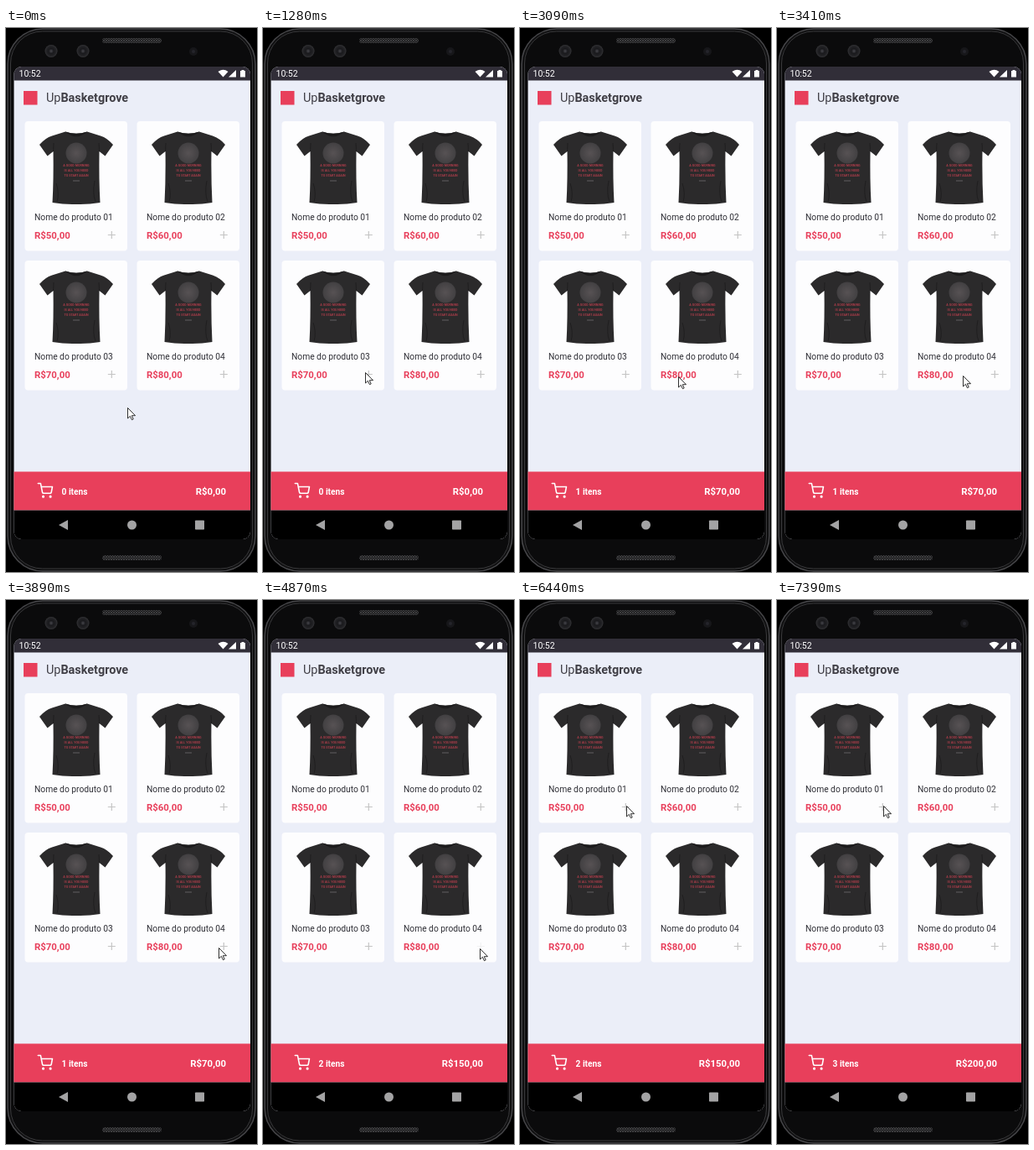
An HTML page that plays this animation: 300 px wide and 648 px high, repeating every 8000 ms.

```html
<!DOCTYPE html>
<html lang="pt-BR">
<head>
<meta charset="utf-8">
<title>Loja</title>
<style>
  html, body { margin: 0; width: 100%; height: 100%; overflow: hidden; background: #000; }
  svg { display: block; width: 100%; height: 100%; font-family: Roboto, Arial, sans-serif; }
  .bold { font-weight: 700; }
  .name { font-size: 10.25px; fill: #2f2f36; }
  .price { font-size: 11.4px; font-weight: 700; fill: #e83f5b; }
  .print { font-size: 3.7px; font-weight: 700; fill: #a83c49; text-anchor: middle; }
</style>
</head>
<body>
<svg viewBox="0 0 300 648" xmlns="http://www.w3.org/2000/svg">
  <defs>
    <radialGradient id="lens">
      <stop offset="0" stop-color="#46464c"/>
      <stop offset=".4" stop-color="#19191c"/>
      <stop offset=".75" stop-color="#222225"/>
      <stop offset="1" stop-color="#333336"/>
    </radialGradient>
    <radialGradient id="disc">
      <stop offset="0" stop-color="#575254"/>
      <stop offset="1" stop-color="#424042"/>
    </radialGradient>
    <pattern id="mesh" width="3" height="3" patternUnits="userSpaceOnUse">
      <rect width="3" height="3" fill="#1b1b1c"/>
      <path d="M0 3L3 0M0 0L3 3" stroke="#444446" stroke-width=".8"/>
    </pattern>
    <clipPath id="screen"><rect x="9.500" y="46" width="282.500" height="563" rx="9"/></clipPath>
    <g id="shirt">
      <path d="M71 123.500Q84 128 97 123.500L113 128.500Q121 131 128 139L118.500 152.500L111.500 147Q111 180 112.500 208Q98 210.500 84 210Q70 210.500 55.500 208Q57 180 56.500 147L49.500 152.500L40 139Q47 131 55 128.500Z" fill="#2b2a2b"/>
      <path d="M71 123.500Q84 135 97 123.500Q84 128 71 123.500Z" fill="#1c1b1c"/>
      <path d="M56.500 147L57 137M111.500 147L111 137M60 185Q64 197 61 207M106 182Q103 197 107 207" fill="none" stroke="#1f1e1f"/>
      <circle cx="84" cy="149" r="12.500" fill="url(#disc)"/>
      <g class="print">
        <text x="84" y="165">A GOOD MORNING</text>
        <text x="84" y="171">IS ALL YOU NEED</text>
        <text x="84" y="177">TO START AGAIN</text>
      </g>
      <path d="M80 182H88" stroke="#6f6d70" stroke-width=".8"/>
    </g>
  </defs>

  <rect width="300" height="648" fill="#000"/>
  <rect x="2" y="1" width="296" height="646" rx="42" fill="#101011" stroke="#47474a" stroke-width="1.500"/>
  <rect x="5.500" y="4" width="289" height="640" rx="38" fill="#0b0b0c" stroke="#38383a"/>
  <rect x="115" y="12" width="71" height="6" rx="3" fill="url(#mesh)"/>
  <rect x="115" y="628" width="71" height="6" rx="3" fill="url(#mesh)"/>
  <circle cx="54" cy="27.500" r="7.500" fill="url(#lens)"/>
  <circle cx="92" cy="27.500" r="7.500" fill="url(#lens)"/>
  <circle cx="224" cy="28" r="5" fill="#17171a"/>
  <circle cx="224" cy="28" r="2" fill="#25252b"/>

  <g clip-path="url(#screen)">
    <rect x="9" y="46" width="284" height="563" fill="#ebeef8"/>
    <rect x="9" y="46" width="284" height="16.500" fill="#312e38"/>
    <text x="15.500" y="58" font-size="10.500" fill="#fff">10:52</text>
    <g fill="#fff">
      <path d="M253.500 52Q259.500 47.500 265.500 52L259.500 58.500Z"/>
      <path d="M275 50V58.500H266Z"/>
      <path d="M280 51H281.500V50H284.500V51H286V58.500H280Z"/>
    </g>

    <rect x="21" y="75" width="16.500" height="16.500" fill="#e83f5b"/>
    <text x="48" y="88" font-size="14.400" fill="#403f46">Up<tspan class="bold">Basketgrove</tspan></text>

    <g id="cards"></g>

    <rect x="9" y="528.500" width="284" height="46" fill="#e83f5b"/>
    <g transform="translate(37.500 541.800) scale(.78)" fill="none" stroke="#fff" stroke-width="2" stroke-linecap="round" stroke-linejoin="round">
      <circle cx="9" cy="21" r="1"/>
      <circle cx="20" cy="21" r="1"/>
      <path d="M1 1h4l2.680 13.390a2 2 0 0 0 2 1.610h9.720a2 2 0 0 0 2-1.610L23 6H6"/>
    </g>
    <text id="count" class="bold" x="66.500" y="555.500" font-size="10.200" fill="#fff"></text>
    <text id="total" class="bold" x="263" y="556" font-size="11.400" fill="#fff" text-anchor="end"></text>

    <rect x="9" y="574.500" width="284" height="35" fill="#000"/>
    <g fill="#a3a3a4">
      <path d="M63 592L74 586V598Z"/>
      <circle cx="150.500" cy="592" r="5.500"/>
      <rect x="226" y="586.500" width="11" height="11" rx=".8"/>
    </g>
  </g>

  <g id="cursor">
    <path d="M.5 .5V13L3.400 10.300L5.400 14.700L7.200 13.900L5.300 9.700H9.500Z" fill="#fff" stroke="#1a1a1a" stroke-width=".9"/>
    <circle id="ring" cx=".3" cy=".3" r="12" fill="#ff0" fill-opacity=".47"/>
  </g>
</svg>
<script>
const LOOP = 8000;
const $ = id => document.getElementById(id);

// Pointer tip: time, x, y
const path = [
  [1040, 145, 452], [1280, 122, 410], [1400, 122, 409], [1550, 122, 409],
  [1670, 125, 413], [2850, 125, 413], [3090, 189, 415], [3650, 246, 414],
  [3890, 254, 414], [3950, 258, 415], [4100, 258, 415], [4130, 259, 415],
  [5450, 259, 415], [5630, 167, 291], [5900, 137, 254], [6160, 127, 243],
  [6370, 127, 243], [6440, 127, 245]
];

// Taps: press and release, icon dimming and recovery, cart update
const taps = [
  { card: 2, down: 2150, up: 2360, dim: 2360, back: 2850, add: 2850, price: 70 },
  { card: 3, down: 4520, up: 4750, dim: 4550, back: 5010, add: 4870, price: 80 },
  { card: 0, down: 6880, up: 7110, dim: 6930, back: 7320, add: 7240, price: 50 }
];

const money = n => `R$${n},00`;

$('cards').innerHTML = [50, 60, 70, 80].map((price, i) => `
  <g transform="translate(${i % 2 * 134} ${(i >> 1) * 166})">
    <rect x="22.500" y="111" width="122.500" height="154.500" rx="4" fill="#fdfdfe"/>
    <use href="#shirt"/>
    <text class="name" x="34" y="229">Nome do produto 0${i + 1}</text>
    <text class="price" x="34" y="251">${money(price)}</text>
    <path class="plus" d="M126.300 242V251M121.800 246.500H130.800" stroke="#c4c4c4" stroke-width="1.200"/>
  </g>`).join('');
const pluses = document.querySelectorAll('.plus');

function pointAt(t) {
  const i = path.findIndex(p => p[0] > t);
  if (i === 0) return path[0].slice(1);
  if (i < 0) return path[path.length - 1].slice(1);
  const a = path[i - 1], b = path[i];
  const k = (t - a[0]) / (b[0] - a[0]);
  return [1, 2].map(j => Math.round(a[j] + (b[j] - a[j]) * k));
}

function plusOpacity(t, tap) {
  if (t < tap.dim) return 1;
  return 0.2 + 0.8 * Math.min(1, Math.max(0, (t - tap.back) / 70));
}

function draw(t) {
  $('cursor').setAttribute('transform', `translate(${pointAt(t)})`);
  const pressed = taps.some(p => t >= p.down && t < p.up);
  $('ring').setAttribute('visibility', pressed ? 'visible' : 'hidden');
  taps.forEach(p => pluses[p.card].setAttribute('opacity', plusOpacity(t, p)));
  const added = taps.filter(p => t >= p.add);
  $('count').textContent = `${added.length} itens`;
  $('total').textContent = money(added.reduce((sum, p) => sum + p.price, 0));
}

const start = performance.now();
function tick() {
  draw((performance.now() - start) % LOOP);
  requestAnimationFrame(tick);
}
tick();
</script>
</body>
</html>
```
